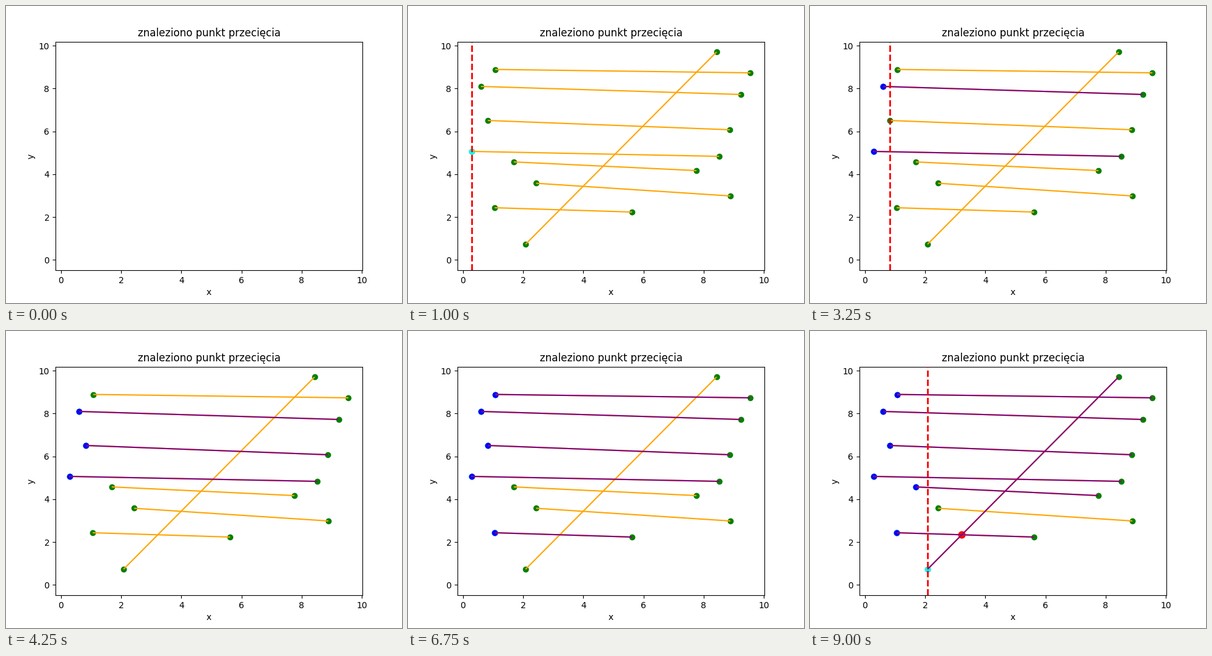
Animation, 640 px wide and 480 px high, one loop 9250 ms. Source, as a matplotlib script:

```python
import matplotlib.pyplot as plt
from matplotlib.animation import FuncAnimation
from matplotlib.collections import LineCollection

FRAMES, INTERVAL, STEPS = 37, 250, 5

# Segments sorted by the x of their left end, the order in which the sweep meets them.
SEGMENTS = [
    [(0.279, 5.064), (8.519, 4.833)],
    [(0.597, 8.095), (9.233, 7.720)],
    [(0.823, 6.507), (8.873, 6.074)],
    [(1.050, 2.436), (5.621, 2.234)],
    [(1.070, 8.888), (9.557, 8.730)],
    [(1.687, 4.573), (7.762, 4.169)],
    [(2.078, 0.733), (8.430, 9.700)],
    [(2.428, 3.577), (8.889, 2.985)],
]


def crossing(first, second):
    (x1, y1), (x2, y2) = first
    (x3, y3), (x4, y4) = second
    m1 = (y2 - y1) / (x2 - x1)
    m2 = (y4 - y3) / (x4 - x3)
    x = (y3 - y1 + m1 * x1 - m2 * x3) / (m1 - m2)
    return x, y1 + m1 * (x - x1)


plt.rcParams["font.family"] = "DejaVu Sans"
fig, ax = plt.subplots(figsize=(6.4, 4.8), dpi=100)
ax.set(title="znaleziono punkt przecięcia", xlabel="x", ylabel="y",
       xlim=(-0.185, 10.021), ylim=(-0.485, 10.185))


def dots(points, color, **style):
    return ax.scatter(*zip(*points), color=color, **style)


def stroke(segments, color, zorder):
    lines = LineCollection(segments, colors=color, linewidths=1.5, zorder=zorder)
    return ax.add_collection(lines, autolim=False)


ends = dots([p for segment in SEGMENTS for p in segment], "green")
pending = stroke(SEGMENTS, "orange", 2)

# One sweep event per segment; the last segment is never reached.
events = [
    (
        ax.axvline(segment[0][0], color="red", linestyle="--", linewidth=2,
                   zorder=2.05 + 0.1 * i),
        dots(segment[:1], "cyan"),
        stroke([segment], "purple", 2.1 + 0.1 * i),
        dots(segment[:1], "blue"),
    )
    for i, segment in enumerate(SEGMENTS[:-1])
]
hit = dots([crossing(SEGMENTS[3], SEGMENTS[6])], "red", s=60)


def update(frame):
    ends.set_visible(frame >= 1)
    pending.set_visible(frame >= 2)
    for i, (sweep, current, active, done) in enumerate(events):
        step = frame - 3 - STEPS * i
        sweep.set_visible(0 <= step < 4)
        current.set_visible(step >= 1)
        active.set_visible(step >= 2)
        done.set_visible(step >= 3 and i < len(events) - 1)
    hit.set_visible(frame == FRAMES - 1)
    return []


anim = FuncAnimation(fig, update, frames=FRAMES, interval=INTERVAL,
                     init_func=lambda: update(0), repeat=True, repeat_delay=0)
plt.show()
```
